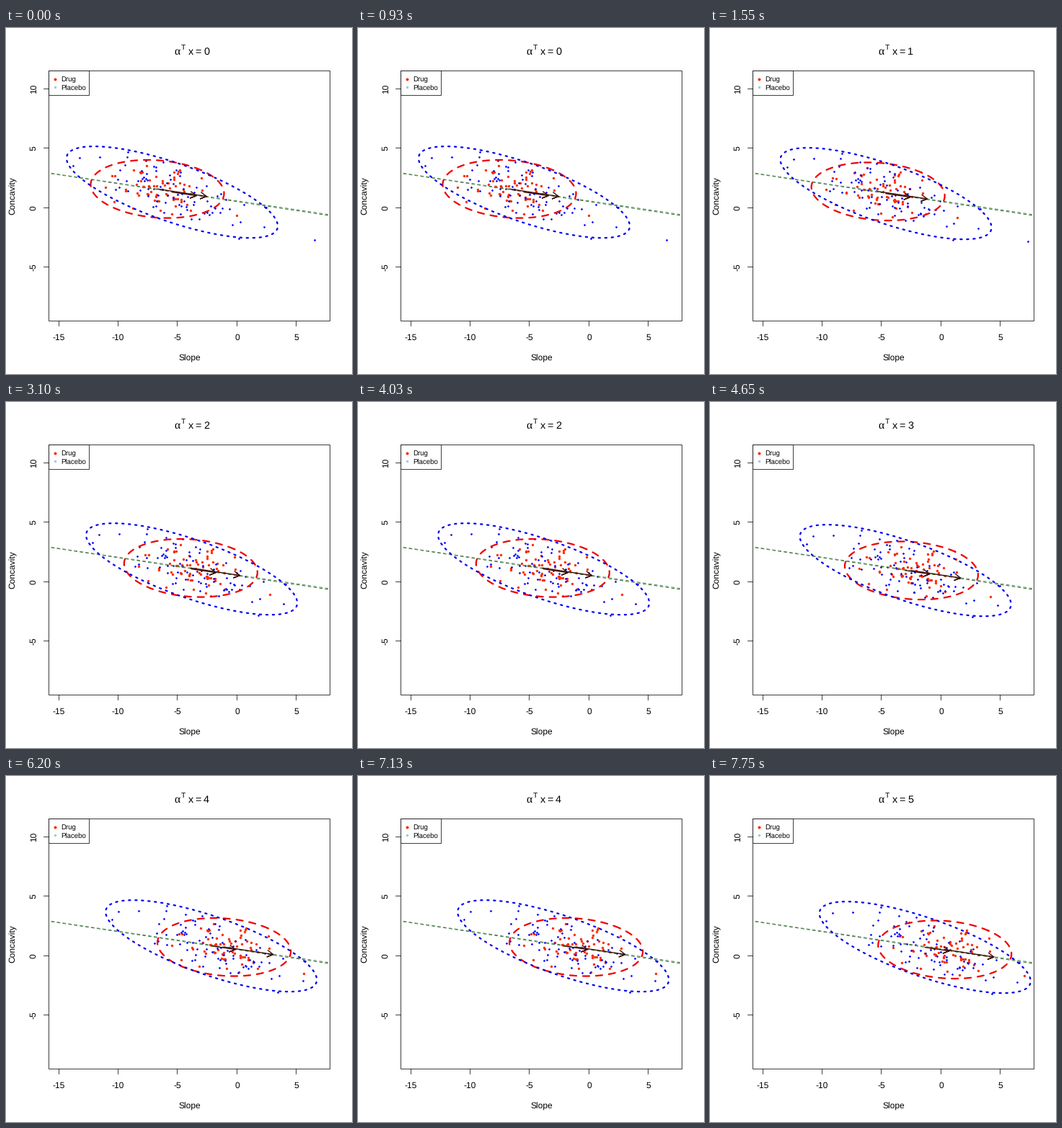
Animation of 480x480 px, one loop 9300 ms. Source, as a matplotlib script:

```python
import numpy as np
import matplotlib.pyplot as plt
from matplotlib.animation import FuncAnimation
from matplotlib.patches import Rectangle

SIZE, DPI = 480, 96
PX = 72 / DPI                        # points per pixel
L, T, R, B = 59.5, 59.5, 449.5, 406.5
X0, Y0, UNIT = 320, 249.1, 16.44     # axis zero and pixels per unit
STEPS, HOLD = 6, 1550
rng = np.random.default_rng(12)

plt.rcParams["font.family"] = "Liberation Sans"
plt.rcParams["text.hinting"] = "no_hinting"
fig = plt.figure(figsize=(SIZE / DPI, SIZE / DPI), dpi=DPI, facecolor="white")


def pixel_axes(left, top, right, bottom):
    ax = fig.add_axes([left / SIZE, 1 - bottom / SIZE,
                       (right - left) / SIZE, (bottom - top) / SIZE])
    ax.set_xlim(left, right)
    ax.set_ylim(bottom, top)
    ax.axis("off")
    return ax


plot = pixel_axes(L, T, R, B)
stage = pixel_axes(0, 0, SIZE, SIZE)


def label(x, y, text, size=12, ha="center", rotation=0, **kw):
    return stage.text(x, y, text, fontsize=size * PX, ha=ha, va="baseline",
                      rotation=rotation, rotation_mode="anchor", **kw)


def line(ax, xs, ys, color="black", width=0.75, **kw):
    return ax.plot(xs, ys, color=color, lw=width * PX, **kw)[0]


def dots(ax, color, marker, size, zorder=2):
    return ax.plot([], [], marker, color=color, ms=size * PX, mew=0,
                   zorder=zorder)[0]


def box(left, top, right, bottom, fill="none"):
    stage.add_patch(Rectangle((left, top), right - left, bottom - top,
                              fc=fill, ec="black", lw=0.75 * PX, snap=False))


def sample(n, center, radii, corr, far):
    """Normal points inside a 95 % ellipse, plus a few far ones."""
    z = rng.normal(size=(2 * n, 2))
    z = z[np.hypot(*z.T) < 2.2][:n]
    z[:, 1] = corr * z[:, 0] + np.sqrt(1 - corr ** 2) * z[:, 1]
    return np.vstack([center + z * radii / 2.45, far])


class Group:
    """Cloud, confidence ellipse and arrow that shift together."""

    def __init__(self, n, far, color, marker, size, center, radii, corr,
                 dash, shift, reach):
        center, radii = np.array(center), np.array(radii)
        self.shift = np.array(shift)
        self.pts = sample(n, center, radii, corr, far)
        d = np.arccos(-corr)
        t = np.linspace(0, 2 * np.pi, 400)
        self.oval = center + radii * np.column_stack(
            [np.cos(t + d / 2), -np.cos(t - d / 2)])
        self.shaft = self.arrow_path(center, reach)
        self.cloud = dots(plot, color[0], marker, size)
        self.ring = line(plot, [], [], color[1], 2.25, zorder=4,
                         ls=(0, dash), dash_capstyle="round")
        self.arrow = line(plot, [], [], "#421008", 1.4, zorder=5,
                          solid_joinstyle="round")

    def arrow_path(self, start, reach):
        tip = start + self.shift * reach / self.shift[0]
        ang = np.arctan2(*self.shift[::-1])
        barbs = [tip - 9 * np.array([np.cos(ang + s), np.sin(ang + s)])
                 for s in (-np.pi / 6, np.pi / 6)]
        return np.array([start, tip, barbs[0], tip, barbs[1]])

    def place(self, k):
        for art, path in ((self.cloud, self.pts), (self.ring, self.oval),
                          (self.arrow, self.shaft)):
            art.set_data(*(path + k * self.shift).T)


groups = [
    Group(70, [(320, 260)], ("#ff2a00", "#f00000"), "o", 3.4,
          (210, 223.3), (92.5, 40.3), 0.15, (4, 4), (23.15, 3.5), 68),
    Group(78, [(93, 191), (102, 180), (130, 179), (169, 172), (361, 249),
               (323, 292), (427.5, 294)],
          ("#0000ff", "#0000f0"), "D", 2.4,
          (230.5, 227.7), (146.5, 63.5), 0.74, (1, 3), (13.55, 2.0), 33.5)]

# Trend lines
for start, end, color in ((202, 260.4, "#2f6b2f"), (201.5, 259, "#5f905f")):
    line(plot, [63, 450], [start, end], color, 1.0, ls=(0, (4, 4)),
         dash_capstyle="round", zorder=3)

# Frame, ticks and labels
box(L, T, R, B)
for v in range(-15, 6, 5):
    x = np.floor(X0 + v * UNIT) + 0.5
    line(stage, [x, x], [B, B + 7], snap=False)
    label(x, 433, str(v))
for v in range(-5, 11, 5):
    y = np.floor(Y0 - v * UNIT) + 0.5
    line(stage, [L - 7, L], [y, y], snap=False)
    label(41.5, y, str(v), rotation=90)
label(254.5, 462, "Slope")
label(13, 233, "Concavity", rotation=90)

# Legend
box(L, T, 115.5, 93.5, "white")
for y, name, color, size in ((70.5, "Drug", "#ff2a00", 4),
                             (82.2, "Placebo", "#9cc9e6", 3.4)):
    dots(stage, color, "o", size, 5).set_data([67.5], [y])
    label(76, y + 3.6, name, 9.6, "left")

# Title
label(233.5, 37, "α", 15.5, "left", family="Liberation Serif")
label(243, 30.5, "T", 10.4, "left")
label(253, 37, "x", 14.4, "left")
label(262.3, 37, "=", 14.4, "left")
count = label(274, 37, "0", 14.4, "left")


def update(k):
    for g in groups:
        g.place(k)
    count.set_text(str(k))
    return []


anim = FuncAnimation(fig, update, frames=STEPS, interval=HOLD,
                     init_func=lambda: update(0), repeat=True,
                     repeat_delay=0, blit=False)
plt.show()
```
